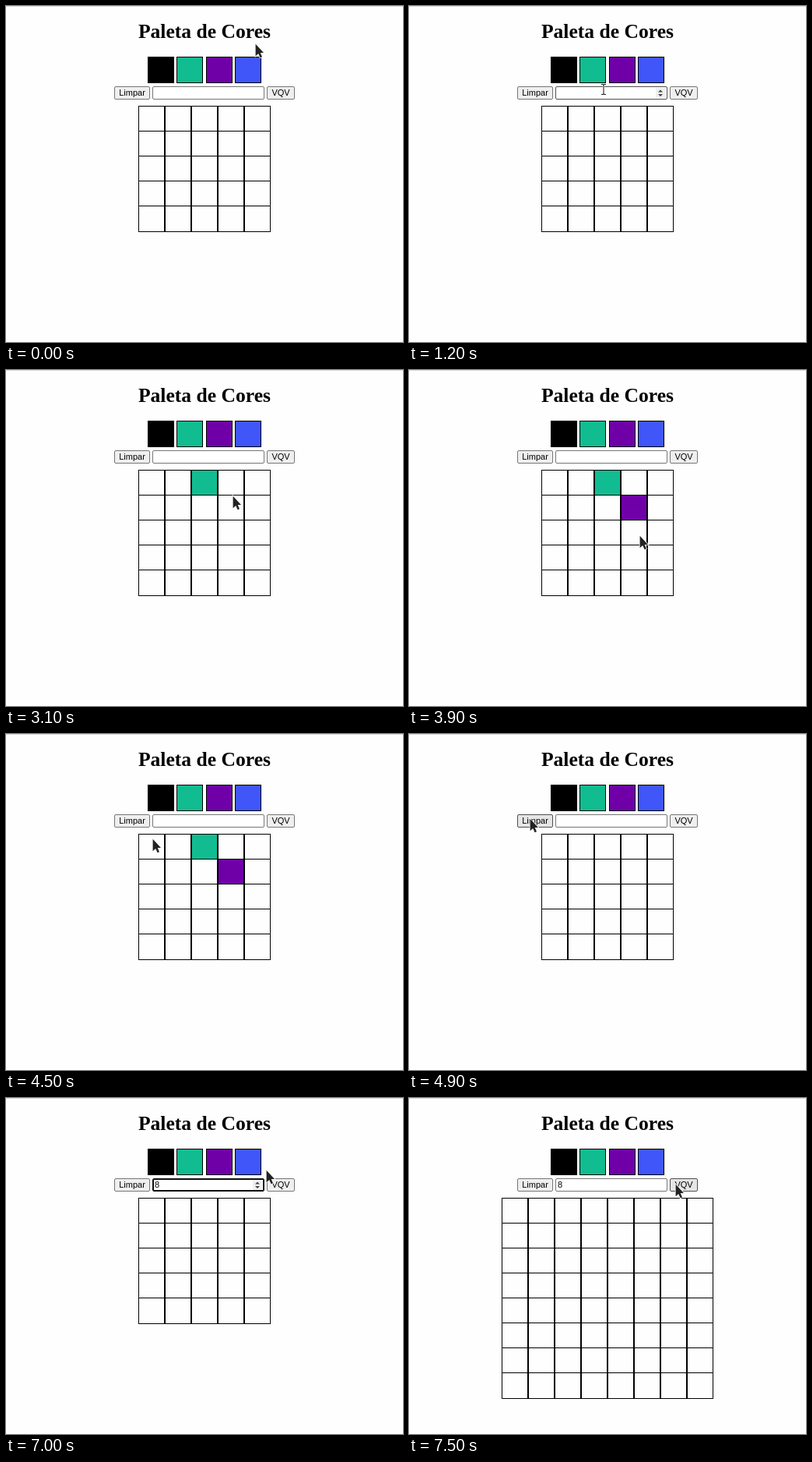
Write an HTML page that moves like this. It is 510 by 431 pixels and loops after 8 s.

```html
<!DOCTYPE html>
<html lang="pt-BR">
<head>
<meta charset="utf-8">
<title>Paleta de Cores</title>
<style>
  html, body { margin: 0; width: 100%; height: 100%; overflow: hidden; background: #fefefe; }
  body { position: relative; font: 11px "Liberation Sans", Arial, sans-serif; color: #000; }
  body * { position: absolute; box-sizing: border-box; }

  /* every moving part shares one 8 s clock; changes are hard steps */
  .anim { animation: 8s step-end -.01s infinite; }

  .rule { left: 0; top: 0; width: 510px; height: 1px; background: #d9d9d9; }
  h1 { left: 0; top: 18px; width: 510px; margin: 0; text-align: center; white-space: nowrap;
       font: bold 25.6px "Liberation Serif", "Times New Roman", serif; }

  .swatch { top: 65px; width: 34px; height: 34px; border: 1px solid #000; }
  .black { background: #000; }
  .green { background: #10bc90; }
  .purple { background: #6f00a8; }
  .blue { background: #4056f8; }

  .button, .field { top: 103px; height: 17px; border: 1px solid #767676; border-radius: 2px; line-height: 15px; }
  .button { background: #efefef; text-align: center; }
  .clear { left: 139px; width: 46px; animation-name: clear; }
  .resize { left: 335px; width: 36px; animation-name: resize; }
  .field { left: 188px; width: 144px; background: #fff; animation-name: field; }
  .digit { left: 2px; top: 0; animation-name: digit; }
  .caret { top: 3px; width: 1px; height: 11px; background: #000; animation-name: caret; }
  .spinner { left: 128px; top: 1px; width: 12px; height: 13px; background: #efefef; animation-name: spinner; }

  .grid { --n: 5; top: 128px; left: calc(255px - var(--n) * 17px);
          box-sizing: content-box; width: calc(var(--n) * 34px); height: calc(var(--n) * 32px);
          padding-bottom: 1px; border-bottom: 1px solid #000;
          background:
            linear-gradient(#000 1px, #0000 0) 0 0 / 34px 32px content-box,
            linear-gradient(90deg, #000 1px, #0000 1px 33px, #000 33px) 0 0 / 34px 100%; }
  .small { animation-name: small; }
  .large { --n: 8; animation-name: large; }
  .cell { width: 32px; height: 31px; }
  .cell.green { left: 69px; top: 1px; animation-name: first; }
  .cell.purple { left: 103px; top: 33px; animation-name: second; }

  .cursor { width: 0; height: 0; animation-name: move; }
  .cursor svg { left: -8px; top: -10px; overflow: visible; }
  .arrow { animation-name: arrow; }
  .beam { animation-name: beam; }

  @keyframes move {
    0% { left: 320px; top: 48px; animation-timing-function: steps(3); }
    3.75% { left: 256px; top: 78px; }
    5% { left: 250px; top: 64px; }
    7.5% { left: 233px; top: 70px; }
    11.25% { left: 233px; top: 70px; animation-timing-function: steps(3); }
    15% { left: 250px; top: 107px; animation-timing-function: steps(2); }
    17.5% { left: 252px; top: 138px; }
    21.25% { left: 252px; top: 138px; animation-timing-function: steps(2); }
    23.75% { left: 253px; top: 136px; }
    26.25% { left: 266px; top: 74px; }
    28.75% { left: 264px; top: 75px; }
    30% { left: 271px; top: 77px; }
    32.5% { left: 270px; top: 80px; }
    33.75% { left: 270px; top: 80px; animation-timing-function: steps(4); }
    38.75% { left: 291px; top: 161px; }
    40% { left: 291px; top: 161px; animation-timing-function: steps(7); }
    48.75% { left: 296px; top: 212px; }
    51.25% { left: 296px; top: 212px; animation-timing-function: steps(5); }
    57.5% { left: 161px; top: 114px; animation-timing-function: steps(4); }
    62.5% { left: 153px; top: 106px; animation-timing-function: steps(4); }
    67.5% { left: 202px; top: 108px; }
    81.25% { left: 232px; top: 106px; }
    82.5% { left: 275px; top: 98px; }
    83.75% { left: 275px; top: 98px; animation-timing-function: steps(3); }
    87.5% { left: 334px; top: 92px; animation-timing-function: steps(2); }
    90%, 100% { left: 342px; top: 110px; }
  }
  @keyframes arrow {
    0%, 16.25%, 82.5% { visibility: visible; }
    15%, 66.25% { visibility: hidden; }
  }
  @keyframes beam {
    0%, 16.25%, 82.5% { visibility: hidden; }
    15%, 66.25% { visibility: visible; }
  }
  @keyframes spinner {
    0%, 16.25%, 92.5% { visibility: hidden; }
    15%, 66.25% { visibility: visible; }
  }
  @keyframes field {
    0%, 16.25%, 92.5% { border-color: #767676; box-shadow: none; }
    15%, 66.25% { border-color: #4f4f4f; box-shadow: none; }
    72.5% { border-color: #101010; box-shadow: inset 0 0 0 1px #101010; }
  }
  @keyframes caret {
    0%, 92.5% { visibility: hidden; left: 2px; }
    72.5% { visibility: visible; left: 2px; }
    77.5%, 90% { visibility: visible; left: 7px; }
    85% { visibility: hidden; left: 7px; }
  }
  @keyframes digit {
    0% { visibility: hidden; }
    77.5% { visibility: visible; }
  }
  @keyframes clear {
    0%, 66.25% { background: #efefef; border-color: #767676; }
    57.5% { background: #e5e5e5; border-color: #4f4f4f; }
  }
  @keyframes resize {
    0% { background: #efefef; border-color: #767676; }
    88.75% { background: #e5e5e5; border-color: #4f4f4f; }
  }
  @keyframes first {
    0%, 60% { visibility: hidden; }
    21.25% { visibility: visible; }
  }
  @keyframes second {
    0%, 60% { visibility: hidden; }
    41.25% { visibility: visible; }
  }
  @keyframes small {
    0% { visibility: visible; }
    93.75% { visibility: hidden; }
  }
  @keyframes large {
    0% { visibility: hidden; }
    93.75% { visibility: visible; }
  }
</style>
</head>
<body>
  <div class="rule"></div>
  <h1>Paleta de Cores</h1>

  <div class="swatch black" style="left:182px"></div>
  <div class="swatch green" style="left:219px"></div>
  <div class="swatch purple" style="left:257px"></div>
  <div class="swatch blue" style="left:294px"></div>

  <div class="button clear anim">Limpar</div>
  <div class="field anim">
    <span class="digit anim">8</span>
    <div class="caret anim"></div>
    <svg class="spinner anim" viewBox="0 0 12 13" fill="#444">
      <path d="M3 5.5 6 2.5 9 5.5ZM3 8 6 11 9 8Z"/>
    </svg>
  </div>
  <div class="button resize anim">VQV</div>

  <div class="grid small anim">
    <div class="cell green anim"></div>
    <div class="cell purple anim"></div>
  </div>
  <div class="grid large anim"></div>

  <div class="cursor anim">
    <svg class="arrow anim" width="24" height="34" viewBox="-8 -10 24 34">
      <path d="M.6 .8V16.2L4.2 12.9 6.6 18.3 9 17.2 6.7 12H11Z"
            fill="#222" stroke="#fff" stroke-width="1.6" paint-order="stroke"/>
    </svg>
    <svg class="beam anim" width="16" height="20" viewBox="-8 -10 16 20" fill="none">
      <path id="stem" d="M-3 -6.5H-1L0 -5.5 1 -6.5H3M0 -6V6M-3 6.5H-1L0 5.5 1 6.5H3" stroke="#fff" stroke-width="2.6"/>
      <path d="M-3 -6.5H-1L0 -5.5 1 -6.5H3M0 -6V6M-3 6.5H-1L0 5.5 1 6.5H3" stroke="#222" stroke-width="1.1"/>
    </svg>
  </div>
</body>
</html>
```
